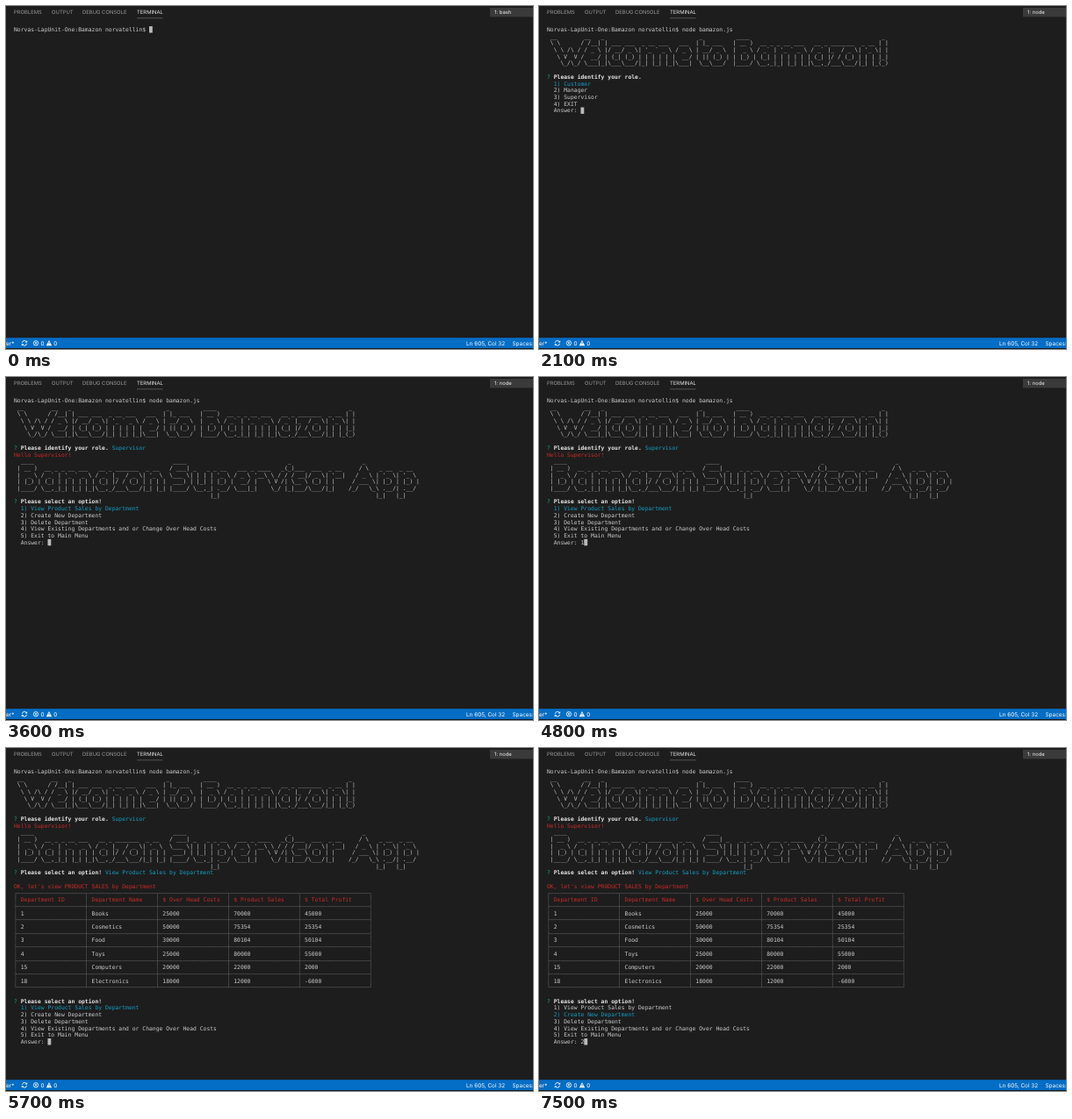
Write an HTML page that moves like this. It is 600 px wide and 391 px high and loops after 8000 ms.

```html
<!DOCTYPE html>
<html lang="en">
<head>
<meta charset="utf-8">
<title>Terminal</title>
<style>
  html, body { margin: 0; width: 100%; height: 100%; overflow: hidden; background: #1d1d1d; }
  svg { position: absolute; left: 0; top: 0; font-family: Inter, sans-serif; text-rendering: geometricPrecision; }
  .tabs { font-size: 5.9px; fill: #999; }
  .status { font-size: 6.4px; fill: #fff; }
  /* Laid out at ten times the size so the character grid stays fractional. */
  pre {
    position: absolute; left: 9px; top: 23.15px; margin: 0; color: #ccc;
    font: 63.95px/77px "DejaVu Sans Mono", monospace; font-variant-ligatures: none;
    text-rendering: geometricPrecision; transform: scale(.1); transform-origin: 0 0;
  }
  b { color: #e5e5e5; }
  .cyan { color: #149fc4; }
  .green { color: #12ad78; }
  .red { color: #c92c27; }
  .grey { color: #666; }
  .cursor { background: #bbb; }
</style>
</head>
<body>
<svg width="600" height="391" viewBox="0 0 600 391">
  <g class="tabs">
    <text x="9" y="9.2">PROBLEMS</text>
    <text x="52" y="9.2">OUTPUT</text>
    <text x="87" y="9.2">DEBUG CONSOLE</text>
    <text x="149" y="9.2" fill="#e7e7e7">TERMINAL</text>
    <path d="M149 13.8h29.5" stroke="#777" stroke-width=".6"/>
    <rect x="551" y="2" width="49" height="10.4" fill="#3a3a3a"/>
    <text id="shell" x="556" y="9.3" fill="#f0f0f0"></text>
  </g>
  <rect y="378.2" width="600" height="11.8" fill="#046dc5"/>
  <rect y="390" width="600" height="1" fill="#141a20"/>
  <g class="status">
    <text x="0" y="386.6">er*</text>
    <text x="39.6" y="386.6">0</text>
    <text x="54.2" y="386.6">0</text>
    <text x="524" y="386.6">Ln 605, Col 32</text>
    <text x="576.5" y="386.6">Spaces:</text>
    <path d="M18.4 383.8a2.6 2.6 0 0 1 4.7-1.2M23.6 384.8a2.6 2.6 0 0 1-4.7 1.2M32.7 383l2.6 2.6m0-2.6l-2.6 2.6" fill="none" stroke="#fff" stroke-width=".9"/>
    <path d="M24.2 381.2v2.4h-2.4zM17.8 387.4v-2.4h2.4z"/>
    <circle cx="34" cy="384.3" r="2.7" fill="none" stroke="#fff" stroke-width=".8"/>
    <path d="M49 381l3.2 6.2h-6.4z"/>
    <path d="M49 383v2m0 .6v.8" stroke="#046dc5" stroke-width=".8"/>
  </g>
</svg>
<pre id="screen"></pre>

<script type="text/plain" id="welcome">
 __        __   _
 \ \      / /__| | ___ ___  _ __ ___   ___
  \ \ /\ / / _ \ |/ __/ _ \| '_ ` _ \ / _ \
   \ V  V /  __/ | (_| (_) | | | | | |  __/
    \_/\_/ \___|_|\___\___/|_| |_| |_|\___|
</script>
<script type="text/plain" id="to">
 _
| |_ ___
| __/ _ \
| || (_) |
 \__\___/
</script>
<script type="text/plain" id="bamazon">
 ____
| __ )  __ _ _ __ ___   __ _ _______  _ __
|  _ \ / _` | '_ ` _ \ / _` |_  / _ \| '_ \
| |_) | (_| | | | | | | (_| |/ / (_) | | | |
|____/ \__,_|_| |_| |_|\__,_/___\___/|_| |_|
</script>
<script type="text/plain" id="bang">
 _
| |
| |
|_|
(_)
</script>
<script type="text/plain" id="supervisor">
  ____                              _
 / ___| _   _ _ __   ___ _ ____   _(_)___  ___  _ __
 \___ \| | | | '_ \ / _ \ '__\ \ / / / __|/ _ \| '__|
  ___) | |_| | |_) |  __/ |   \ V /| \__ \ (_) | |
 |____/ \__,_| .__/ \___|_|    \_/ |_|___/\___/|_|
             |_|
</script>
<script type="text/plain" id="app">
     _
    / \   _ __  _ __
   / _ \ | '_ \| '_ \
  / ___ \| |_) | |_) |
 /_/   \_\ .__/| .__/
         |_|   |_|
</script>

<script>
const byId = id => document.getElementById(id);
const paint = name => text => `<span class="${name}">${text}</span>`;
const cyan = paint('cyan'), green = paint('green'), red = paint('red'), grey = paint('grey');
const cursor = paint('cursor')(' ');

// Sets word blocks side by side; a later block covers the end of an earlier one.
function banner(height, words) {
  return Array.from({ length: height }, (_, row) =>
    Object.entries(words).reduce((line, [id, column]) => {
      const art = byId(id).textContent.split('\n').slice(1);
      return line.slice(0, column).padEnd(column) + (art[row] ?? '');
    }, ''));
}

const ask = question => `${green('?')} <b>${question}</b>`;

function menu(question, options, picked, typed = '') {
  const lines = options.map((option, i) => {
    const line = `  ${i + 1}) ${option}`;
    return i + 1 === picked ? cyan(line) : line;
  });
  return [ask(question), ...lines, `  Answer: ${typed}${cursor}`];
}

function table(head, rows) {
  const rule = (left, cross, right) =>
    grey(left + head.map(() => '─'.repeat(20)).join(cross) + right);
  const bar = grey('│');
  const line = (cells, style = text => text) =>
    bar + cells.map(cell => style(` ${cell}`.padEnd(20)) + bar).join('');
  return [
    rule('┌', '┬', '┐'), line(head, red),
    ...rows.flatMap(row => [rule('├', '┼', '┤'), line(row)]),
    rule('└', '┴', '┘'),
  ];
}

const roleQuestion = 'Please identify your role.';
const roles = ['Customer', 'Manager', 'Supervisor', 'EXIT'];
const taskQuestion = 'Please select an option!';
const tasks = [
  'View Product Sales by Department', 'Create New Department', 'Delete Department',
  'View Existing Departments and or Change Over Head Costs', 'Exit to Main Menu',
];
const sales = table(
  ['Department ID', 'Department Name', '$ Over Head Costs', '$ Product Sales', '$ Total Profit'],
  [
    [1, 'Books', 25000, 70000, 45000],
    [2, 'Cosmetics', 50000, 75354, 25354],
    [3, 'Food', 30000, 80104, 50104],
    [4, 'Toys', 25000, 80000, 55000],
    [15, 'Computers', 20000, 22000, 2000],
    [18, 'Electronics', 18000, 12000, -6000],
  ]);

const prompt = 'Norvas-LapUnit-One:Bamazon norvatellin$ ';
const command = prompt + 'node bamazon.js ';
const home = [command, ...banner(5, { welcome: 0, to: 44, bamazon: 55, bang: 98 }), ''];
const chosen = [...home, `${ask(roleQuestion)} ${cyan(roles[2])}`];
const office = [...chosen, red('Hello Supervisor!'),
  ...banner(6, { bamazon: 1, supervisor: 45, app: 98 })];
const viewing = [...office, `${ask(taskQuestion)} ${cyan(tasks[0])}`, '',
  red("OK, let's view PRODUCT SALES by Department")];
const report = [...viewing, ...sales, ''];

const steps = [
  [0, [prompt + cursor]],
  [1200, [command + cursor]],
  [1800, [command, cursor]],
  [2100, [...home, ...menu(roleQuestion, roles, 1)]],
  [3000, [...home, ...menu(roleQuestion, roles, 3, '3')]],
  [3300, [...chosen, cursor]],
  [3600, [...office, ...menu(taskQuestion, tasks, 1)]],
  [4800, [...office, ...menu(taskQuestion, tasks, 1, '1')]],
  [5400, [...viewing, cursor]],
  [5700, [...report, ...menu(taskQuestion, tasks, 1)]],
  [7500, [...report, ...menu(taskQuestion, tasks, 2, '2')]],
];

let shown;
function draw() {
  const time = performance.now() % 8000;
  const step = steps.findLast(([start]) => start <= time);
  if (step !== shown) {
    shown = step;
    byId('screen').innerHTML = step[1].join('\n');
    byId('shell').textContent = time < 1800 ? '1: bash' : '1: node';
  }
  requestAnimationFrame(draw);
}
draw();
</script>
</body>
</html>
```
